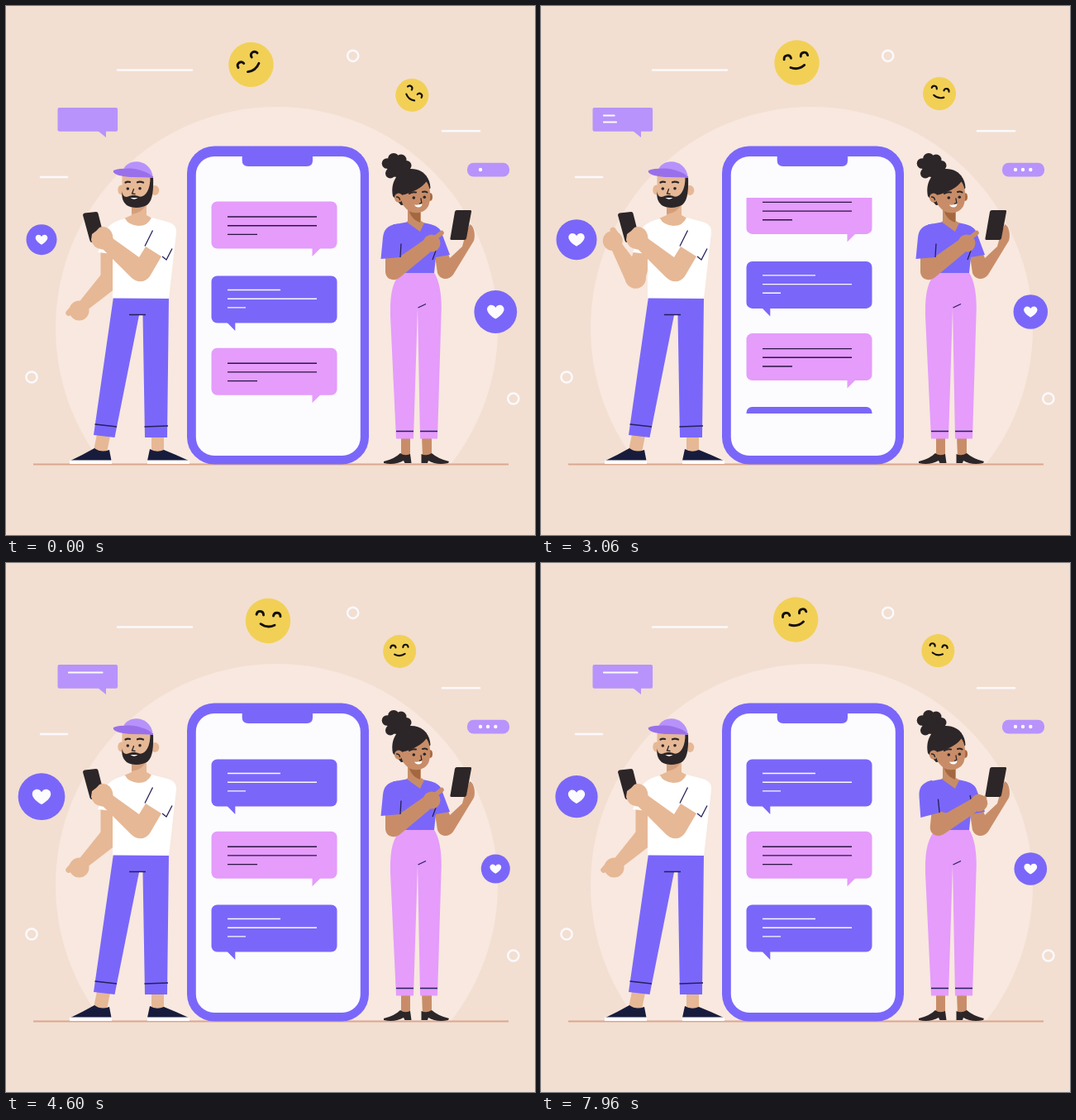
An HTML page for the animation above (8 s loop, 640 by 640 pixels).

```html
<!DOCTYPE html>
<html>
<head>
<meta charset="utf-8">
<style>
html, body { margin: 0; width: 100%; height: 100%; overflow: hidden; background: #f2dfd1; }
svg { display: block; width: 100vw; height: 100vh; }
.violet { fill: #7a67f9; }
.lilac { fill: #b893fb; }
.pink { fill: #e59cfb; }
.white { fill: #fcfcff; }
.dark { fill: #2c2628; }
.navy { fill: #181c3c; }
.tan { fill: #e6b896; }
.brown { fill: #c88d68; }
.line { fill: none; stroke: #26205a; stroke-width: 1.3; }
.ink { fill: none; stroke: #2c2628; stroke-width: 1.3; stroke-linecap: round; }
.deco { fill: none; stroke: #fbf9fd; stroke-width: 2.5; stroke-linecap: round; }
</style>
</head>
<body>
<svg viewBox="0 0 640 640">
  <defs>
    <clipPath id="ground"><rect width="640" height="554"/></clipPath>
    <clipPath id="screen"><rect x="230" y="232" width="199" height="261"/></clipPath>
    <g id="smiley">
      <circle r="27.2" fill="#f2d056"/>
      <path d="M-14.5-6.5C-14-12-6.500-12-6-6.500M6-6.500C6.500-12 14-12 14.500-6.500M-8.500 4.500Q0 9.500 8.500 4.500" fill="none" stroke="#14100e" stroke-width="2.900" stroke-linecap="round"/>
    </g>
    <g id="like">
      <circle r="26" class="violet"/>
      <path class="white" d="M0 8.500C-5 6-10.300 1-10.300-3C-10.300-8.500-3-10.500 0-5C3-10.500 10.300-8.500 10.300-3C10.300 1 5 6 0 8.500Z"/>
    </g>
  </defs>

  <circle cx="327.500" cy="389.500" r="267.500" fill="#f8e8df" clip-path="url(#ground)"/>
  <path d="M33 554.500H608" stroke="#dba78f" stroke-width="2"/>
  <path class="deco" d="M135 77.500H225M528 151.300H573M42 207H74"/>
  <g class="deco">
    <circle cx="419.700" cy="60.300" r="6.600"/>
    <circle cx="31" cy="449" r="6.600"/>
    <circle cx="613.800" cy="475" r="6.600"/>
  </g>

  <!-- speech bubble and typing pill -->
  <rect class="lilac" x="62.500" y="123" width="72.600" height="28.800" rx="2"/>
  <path class="lilac" d="M111 151H121V159Z"/>
  <rect id="type1" class="white" x="75" y="131.500" height="2" rx=".8"/>
  <rect id="type2" class="white" x="75" y="139.500" height="2" rx=".8"/>
  <rect class="lilac" x="558" y="189.700" width="51" height="16.800" rx="7.500"/>
  <g id="dots" class="white">
    <circle cx="574" cy="198" r="2.200"/><circle cx="583" cy="198" r="2.200"/><circle cx="592.300" cy="198" r="2.200"/>
  </g>

  <use id="smileL" href="#smiley"/>
  <use id="smileR" href="#smiley"/>
  <use id="likeL" href="#like"/>
  <use id="likeR" href="#like"/>

  <!-- phone -->
  <rect class="violet" x="219" y="169.500" width="220" height="385" rx="33"/>
  <rect class="white" x="229.800" y="182" width="199" height="362" rx="22"/>
  <path class="violet" d="M285.700 181H371V187Q371 194 364 194H293Q285.700 194 285.700 187Z"/>
  <g clip-path="url(#screen)"><g id="chat"></g></g>

  <!-- man -->
  <g>
    <path id="upper" fill="none" stroke="#e6b896" stroke-width="23"/>
    <g id="fore" class="tan">
      <circle r="12.500"/>
      <path d="M0-12.500L50-6V7L0 12.500Z"/>
      <circle cx="53" r="12"/>
      <path d="M54 7.500L64 7" stroke="#e6b896" stroke-width="7" stroke-linecap="round"/>
    </g>
    <path class="tan" d="M110 518L126 520L122 540L106 538ZM176 519H191V540H176Z"/>
    <path class="navy" d="M107 535Q115 541 125 537L127.500 550H78Q93 543 107 535ZM174 536Q182 541 191 537Q206 543 221 550H171Z"/>
    <path fill="#fff" d="M77 549.500H128V554H77ZM171 549.500H222V554H171Z"/>
    <path class="violet" d="M130 352H197L195 522H168L165.500 374H161L131.500 522L106 519Z"/>
    <path class="line" d="M149 373.500H169M107.500 506L134 509M167.500 509L196 508"/>
    <path class="tan" d="M152 236H170V253L177 257L172 270H148L143 257L152 253Z"/>
    <path d="M152 244L170 239Q166 250 152 252Z" fill="#d49f7b"/>
    <path fill="#fff" d="M144 257C133 260 125 264 122 270L111 298L129 300V353.500L197 354L206 274C206.500 266 202 263 195 261L176 256Q172 266 160 266Q148 265 144 257Z"/>
    <ellipse class="tan" cx="139.500" cy="222.500" rx="4.200" ry="6"/>
    <ellipse class="tan" cx="180" cy="223" rx="5.300" ry="6"/>
    <path class="tan" d="M140.500 203H177V228Q176 241 159 242Q141 241 140.500 228Z"/>
    <path class="dark" d="M140.500 224C141 230 144 232 148 230.500C152 228.500 157 228.500 161 230.500C168 232 175 223 174.500 206H178C178.500 221 178 235 171 240.500C164 245 152 245 146 241C140.500 236 140 231 140.500 224Z"/>
    <path d="M150.500 232Q155 235.300 159.500 232Z" fill="#fff"/>
    <path class="ink" stroke-width="2.200" d="M144.500 213.500Q147 212 150 213M159 213.300Q162 212 166 213.500" style="stroke-width:2.300"/>
    <path class="ink" d="M154.500 221.500L152.500 227L156 227.500"/>
    <circle class="dark" cx="147.300" cy="221" r="1.800"/>
    <circle class="dark" cx="162" cy="220.700" r="1.800"/>
    <path d="M141.500 200C144 184 175 182 178 208L150 205Z" fill="#b792fb"/>
    <path d="M130 199C138 196 152 196 160 198C168 200 175 203 178 207.500L152 207C141 206.500 128 204 130 199Z" fill="#9a70ea"/>
    <path class="dark" d="M95 250.500L109 249Q111 249 111.500 251L119 281Q119 283 117 283.500L104 286Q102 286 101.500 284L93 253Q93 251 95 250.500Z"/>
    <path class="tan" d="M117 294L129 281L161 304L169 291L188 303L174 327C168 335.500 158 335 151 328Z"/>
    <path class="tan" d="M104 276Q110 272 113 268Q119 265 125 270Q131 276 129 286Q126 295 116 294.500Q105 293 103 283Z"/>
    <path class="line" d="M177.500 271.500L168 290.500M189 303L194 307L201 293.500"/>
  </g>

  <!-- woman -->
  <g>
    <path class="brown" d="M519 303L535 300L537 305L552 291L555 280L561 264C567 266 568 279 566 284L541 325C535 333 525 331 522 323Z"/>
    <path class="dark" d="M545.500 247H561.500Q563.500 247 563 249L557 281Q556.500 283 554.500 283H539Q537 283 537.500 281L543 249Q543.500 247 545.500 247Z"/>
    <path class="brown" d="M478 520H489V546H478ZM503 520H515V546H504Z"/>
    <path class="dark" d="M457 551Q470 548 477 541Q482 545 489 542L490.500 553H482.500L481 550Q470 556 457 553ZM502.500 542Q508 545 515 541Q523 548 536 551L535 553Q521 556 511 550L510 553H502.500Z"/>
    <path class="pink" d="M479 321H517C526 334 527.500 355 526.500 375L522 523.500H501L498 365L493 523.500H472L465 375C464.500 350 467 333 479 321Z"/>
    <path class="line" d="M498.500 365L508 360.500M472 514.500H493M501 514.500H522"/>
    <path class="brown" d="M486 244H502V260L507 263L501 276L484 262L486 260Z"/>
    <path d="M487 246L501 250V262Q490 258 487 246Z" fill="#a3683f"/>
    <path class="violet" d="M468 264.500L485 261.500L501 273L506 262.500C516 264 524 267 526.500 273L537 301L520 304L518 323H479.500L474 290Z"/>
    <path class="line" d="M519 281L521 290M516 307L520 296"/>
    <g class="dark">
      <circle cx="473" cy="195" r="12"/><circle cx="469" cy="185" r="7"/><circle cx="478" cy="186" r="6.500"/>
      <circle cx="484.500" cy="193" r="6"/><circle cx="461" cy="190.500" r="6.300"/><circle cx="465" cy="202.500" r="6"/>
      <path d="M468 230C464 211 477 197 490 197C503 197 513 206 513.500 220L500 238L478 241Z"/>
    </g>
    <ellipse cx="513" cy="231" rx="3" ry="4.700" fill="#a9683f"/>
    <path class="brown" d="M478 229Q500 224 508.500 212.500C514 219 514.500 234 511 242C507 250 495 252.500 487.500 248C481 243 478 239 478 229Z"/>
    <ellipse class="brown" cx="475" cy="232" rx="5" ry="5.500"/>
    <path class="ink" d="M472.500 231Q476 231 476.500 234.500M502 233L502.800 238L500.500 239"/>
    <path class="ink" d="M488 227Q491 224.500 496 225.500M504 225Q507 224 509.500 225.500" style="stroke-width:2"/>
    <circle class="dark" cx="493.300" cy="232" r="1.800"/>
    <circle class="dark" cx="506.300" cy="231.300" r="1.800"/>
    <path d="M494 240.500Q499 241 503.500 239.500Q503 243.500 499 243.500Q495.500 243.500 494 240.500Z" fill="#fff"/>
    <g id="sleeve">
      <g id="reach">
        <path class="brown" d="M459 300V322C460 332 471 333.500 477 328L513 298L507 282L477 303Z"/>
        <circle class="brown" cx="515" cy="287" r="10.500"/>
        <path id="finger" stroke="#c88d68" stroke-width="5.500" stroke-linecap="round"/>
      </g>
      <path class="violet" d="M474 263.500C461 265 457 271 456 280L453.500 306L477 304L482 276Z"/>
      <path class="line" d="M478 287.500L477 304"/>
    </g>
  </g>
</svg>
<script>
const LOOP = 8000;
const $ = id => document.getElementById(id);
const place = (id, value) => $(id).setAttribute('transform', value);
const clamp = x => Math.min(1, Math.max(0, x));
const ramp = (t, start, length) => clamp((t - start) / length);
const ease = (t, start, length) => (1 - Math.cos(Math.PI * ramp(t, start, length))) / 2;
const wave = (t, period) => Math.cos(2 * Math.PI * t / period);

function message(y, mine) {
  const [lengths, top, ink, fill, tail] = mine
    ? [[64, 108, 22], 17, '#fcfcff', 'violet', 'M267 56H277.3V66.500Z']
    : [[108, 108, 36], 18.5, '#2a1545', 'pink', 'M370.500 56H381L370.500 66.500Z'];
  const lines = lengths.map((w, i) => `M268 ${top + i * 10.7}h${w}`).join('');
  return `<g transform="translate(0 ${y})" class="${fill}">
    <rect x="248.500" width="152" height="57" rx="7"/><path d="${tail}"/>
    <path d="${lines}" stroke="${ink}" stroke-width="1.400"/></g>`;
}
$('chat').innerHTML = message(236.5, false) + message(326.5, true) +
  message(413.7, false) + message(502.5, true);

function smile(id, x, midX, topY, bend, tilt, size) {
  place(id, `translate(${x} ${topY + bend * (x - midX) ** 2}) rotate(${tilt}) scale(${size})`);
}

function draw(t) {
  const slow = wave(t, 11400);
  const xL = 307.3 - 10.8 * wave(t, 10800);
  const xR = 483 + 8.3 * slow;
  smile('smileL', xL, 308, 68.5, 0.018, (xL - 314.5) * 2.1, 1);
  smile('smileR', xR, 482.5, 106, 0.024, (xR - 477.3) * 2.75, 0.735);
  place('likeL', `translate(43 282.700) scale(${(23.9 - 5.4 * slow) / 26})`);
  place('likeR', `translate(592.300 370) scale(${(21.3 + 4.6 * slow) / 26})`);

  const beat = t % 3600;
  $('type1').setAttribute('width', 42.5 * (ramp(beat, 100, 600) - ramp(beat, 2720, 520)));
  $('type2').setAttribute('width', 17 * (ramp(beat, 1190, 290) - ramp(beat, 3490, 100)));
  [...$('dots').children].forEach((dot, i) => {
    dot.style.opacity = beat >= i * 250 && beat < 3560 ? 1 : 0;
  });

  place('chat', `translate(0 ${-89 * ease(t, 2606, 1550)})`);

  // man's far arm: 0 hanging, 1 raised
  const lift = ease(t, 150, 1000) - ease(t, 2640, 1550);
  const x = 126 - 14 * lift, y = 331 - 2 * lift;
  $('upper').setAttribute('d', `M126 290L${x} ${y}`);
  place('fore', `translate(${x} ${y}) rotate(${-225 + 125 * lift})`);

  // woman's near arm moves in to the phone
  const tap = ease(t, 5400, 1100);
  place('sleeve', `rotate(${-9.5 * tap} 468 272)`);
  place('reach', `translate(${4 * tap} 0) rotate(${15 * tap} 468 320)`);
  $('finger').setAttribute('d', `M516 283L${527 - 6 * tap} ${274.5 + 6 * tap}`);
}

function frame(now) {
  draw(now % LOOP);
  requestAnimationFrame(frame);
}
draw(0);
requestAnimationFrame(frame);
</script>
</body>
</html>
```
